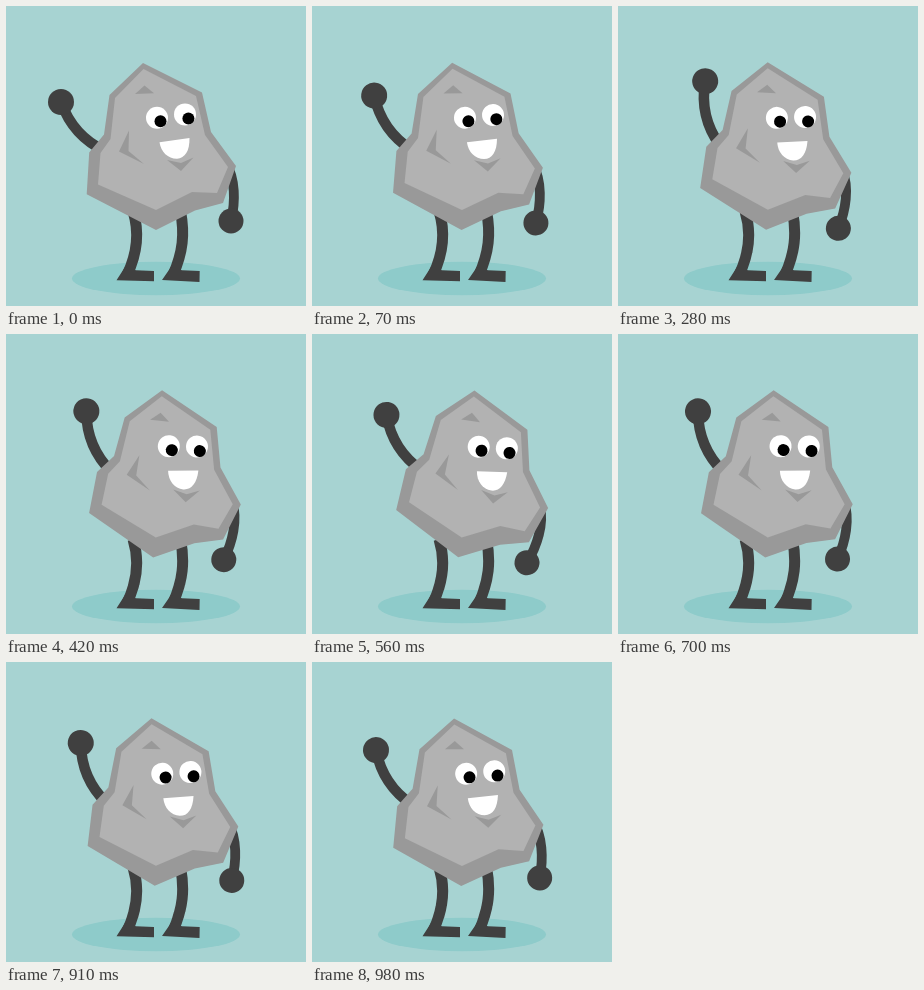
Animation, 300 px wide and 300 px high, one loop 1050 ms. Source, as an HTML page:

```html
<!DOCTYPE html>
<html lang="en">
<head>
<meta charset="utf-8">
<title>Waving rock</title>
<style>
  html, body { margin: 0; width: 100%; height: 100%; overflow: hidden; background: #a7d3d2; }
  svg { display: block; width: 100%; height: 100%; }
  .limb { fill: none; stroke: #404040; }
  .solid { fill: #404040; }
  .dark { fill: #999; }
  .light { fill: #b2b2b2; }
  .white { fill: #fff; }
</style>
</head>
<body>
<svg viewBox="0 0 300 300">
  <rect width="300" height="300" fill="#a7d3d2"/>
  <ellipse cx="150" cy="272.5" rx="84" ry="16.7" fill="#8ecbca"/>

  <g id="legs">
    <path class="limb" stroke-width="11" d="M127 205C133.5 226 132 246 121 269"/>
    <path class="solid" d="M119 261L130 264.3L148 265L148 275.2L110.5 274.2Z"/>
    <path class="limb" stroke-width="11" d="M174.5 205C178.8 228 177 246 167 269"/>
    <path class="solid" d="M165 261L176 264.3L193.7 265L193.5 276L156 274Z"/>
  </g>

  <g id="body">
    <g id="waveArm">
      <path class="limb" stroke-width="10.5" d="M55 96Q67 130 99 145"/>
      <circle class="solid" cx="55" cy="96" r="13"/>
    </g>
    <g id="restArm">
      <path class="limb" stroke-width="9.8" d="M220 157C229.5 173 229.5 196 225 215"/>
      <circle class="solid" cx="225" cy="215" r="12.5"/>
    </g>

    <path class="dark" d="M137 57L196 86.5L205 126L230 160L217 197L189 204.5L150 224L80.7 188.3L83.2 146.6L98 128.6L103.5 89Z"/>
    <path class="light" d="M137.5 63L190 90L199 129L222 161L211 187L186 186L150 204L92 178.4L94.5 147L104.5 133L109 92Z"/>
    <path class="dark" d="M129 88L138.5 79.5L148 87.3Z"/>
    <path class="dark" d="M123 124.5L113 145.5L138 158L122.5 145Z"/>
    <path class="dark" d="M161 154L175 165L187.5 151.5L175 157Z"/>

    <circle class="white" cx="151" cy="111.7" r="11"/>
    <circle class="white" cx="179" cy="108.4" r="11"/>
    <circle cx="154.5" cy="115.2" r="6"/>
    <circle cx="182.4" cy="112.5" r="6"/>
    <path class="white" d="M153.5 136.2L183.5 132C183.7 145 179 152.2 171 152.7C162 152.8 155 146 153.5 136.2Z"/>
  </g>
</svg>
<script>
  const LOOP = 1050, STEP = 70;
  const part = id => document.getElementById(id);
  const body = part('body'), waveArm = part('waveArm'), restArm = part('restArm');

  // Keys are [step, degrees] pairs, joined by straight lines.
  const LEAN = [[0, 0], [8, 10], [15.5, 0]];
  const WAVE = [[0, 0], [4, 24], [8, -0.5], [12, 24], [14, 6.4], [15, 0]];
  const SWING = [[0, 0], [8, 7.8], [15, -6]];

  function valueAt(keys, x) {
    const i = keys.findIndex(k => k[0] > x);
    const [x0, y0] = keys[i - 1], [x1, y1] = keys[i];
    return y0 + (y1 - y0) * (x - x0) / (x1 - x0);
  }

  function turn(node, angle, x, y) {
    node.setAttribute('transform', `rotate(${angle} ${x} ${y})`);
  }

  function draw(time) {
    const step = Math.floor(time % LOOP / STEP);
    turn(body, valueAt(LEAN, step), 153, 202);
    turn(waveArm, valueAt(WAVE, step), 100, 139);
    turn(restArm, valueAt(SWING, step), 203, 170);
  }

  const start = performance.now();
  function tick() {
    draw(performance.now() - start);
    requestAnimationFrame(tick);
  }
  tick();
</script>
</body>
</html>
```
